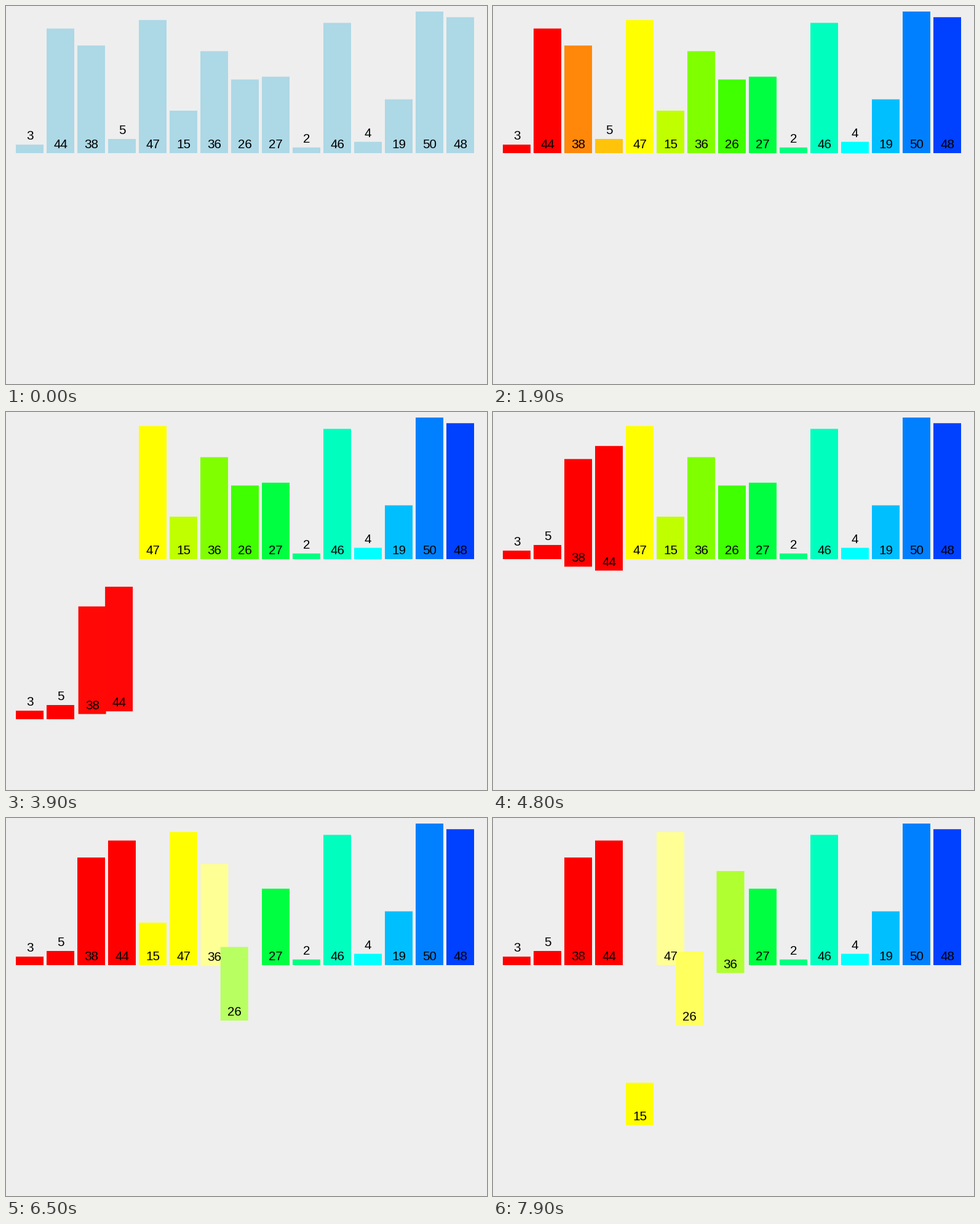
These frames come from a looping animation (782 px wide and 614 px high, 8 s). A matplotlib script:

```python
import colorsys

import matplotlib.pyplot as plt
import numpy as np
from matplotlib.animation import FuncAnimation
from matplotlib.patches import Rectangle

W, H, DPI = 782, 614, 100
FRAMES, INTERVAL = 80, 100
VALUES = [3, 44, 38, 5, 47, 15, 36, 26, 27, 2, 46, 4, 19, 50, 48]
N = len(VALUES)
LEFT, PITCH, BAR_W = 16, 50, 45
BASE, DROP, UNIT = 239, 260, 4.6

# Times are in ticks of 100 ms; steps start in pairs, the second cutting in early.
STARTS = [4.57, 9.14, 13.7, 18.5, 22.82, 27.5, 31.8, 36.64, 41.13,
          45.7, 50.5, 54.84, 59.4, 63.93, 68.55, 73.1, 77.69]
GAP, DURATION = 0.86, 1.95

# Columns of a state: x, drop, r, g, b
X, Y, RGB = 0, 1, slice(2, 5)


def hue(i):
    return colorsys.hsv_to_rgb((i if i < 8 else i + 1) * 15 / 360, 1, 1)


def light(rgb):
    return np.minimum(np.array(rgb) + 150 / 255, 1)


def ease(t):
    t = min(max(t, 0), 1)
    return 4 * t**3 if t < 0.5 else 1 - 4 * (1 - t)**3


def merge_steps(state, row, lo, hi):
    """Yield the target state after every step of a top-down merge sort."""
    if hi - lo < 2:
        return
    mid = (lo + hi + 1) // 2
    yield from merge_steps(state, row, lo, mid)
    yield from merge_steps(state, row, mid, hi)

    group = state[row[lo], RGB].copy()
    sides = [row[lo:mid], row[mid:hi]]
    for side in sides:
        state[side[0], RGB] = light(state[side[0], RGB])
    yield state.copy()

    merged = []
    while any(sides):
        side = min((s for s in sides if s), key=lambda s: VALUES[s[0]])
        bar = side.pop(0)
        state[bar, X] = LEFT + PITCH * (lo + len(merged))
        state[bar, Y] = DROP
        state[bar, RGB] = group
        if side:
            state[side[0], RGB] = light(state[side[0], RGB])
        merged.append(bar)
        yield state.copy()

    for bar in merged:
        state[bar, Y] = 0
        yield state.copy()
    row[lo:hi] = merged


start = np.zeros((N, 5))
start[:, X] = LEFT + PITCH * np.arange(N)
start[:, RGB] = np.array([173, 216, 230]) / 255
rainbow = start.copy()
rainbow[:, RGB] = [hue(i) for i in range(N)]

times = [STARTS[0]] + [s + d for s in STARTS[1:] for d in (0, GAP)]
steps = list(zip(times, times[1:] + [FRAMES],
                 merge_steps(rainbow, list(range(N)), 0, N)))


def state_at(t):
    """Each step eases on from wherever the one before was cut off."""
    now = start.copy()
    for begin, end, target in steps:
        if t <= begin:
            break
        now += (target - now) * ease((min(t, end) - begin) / DURATION)
    return now


fig = plt.figure(figsize=(W / DPI, H / DPI), dpi=DPI, facecolor="#eeeeee")
ax = fig.add_axes([0, 0, 1, 1])
ax.set_xlim(0, W)
ax.set_ylim(H, 0)
ax.axis("off")

bars, labels = [], []
for v in VALUES:
    bar = Rectangle((0, 0), BAR_W, v * UNIT, linewidth=0, snap=False)
    bars.append(ax.add_patch(bar))
    labels.append(ax.text(0, 0, str(v), ha="center", va="baseline", zorder=3,
                          color="black", family="Liberation Sans",
                          fontsize=20.7 * 72 / DPI))


def draw(frame):
    for v, bar, label, s in zip(VALUES, bars, labels, state_at(frame)):
        bottom = BASE + s[Y]
        top = bottom - v * UNIT
        bar.set_xy((s[X], top))
        bar.set_facecolor(np.clip(s[RGB], 0, 1))
        label.set_position((s[X] + BAR_W / 2, (top if v < 6 else bottom) - 8))
    return bars + labels


anim = FuncAnimation(fig, draw, frames=FRAMES, interval=INTERVAL,
                     repeat=True, repeat_delay=0, blit=False)
plt.show()
```
